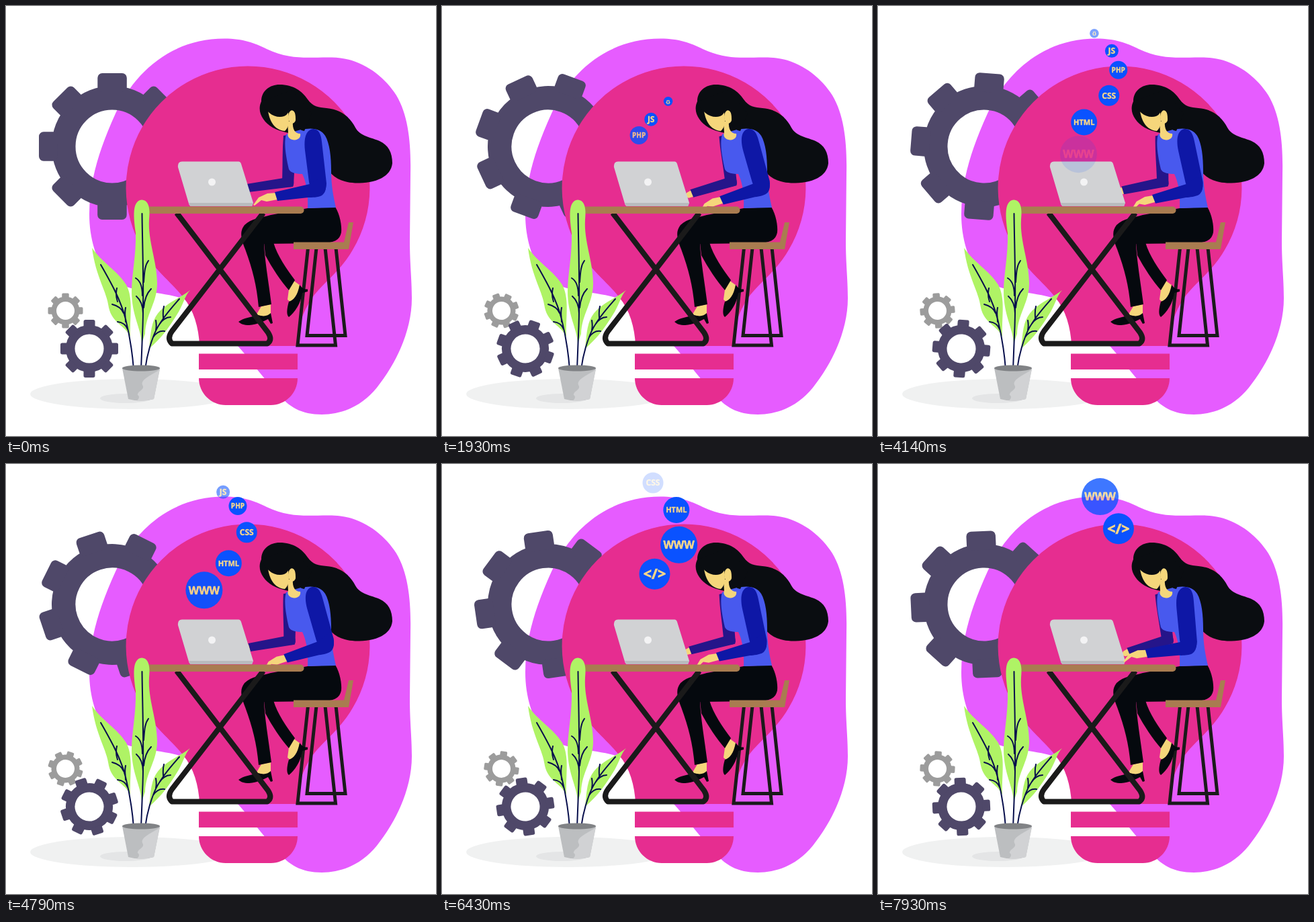
These frames come from a looping animation (640x640 px, 8000 ms). An HTML page:

```html
<!DOCTYPE html>
<html lang="en">
<head>
<meta charset="utf-8">
<title>Coding at a desk</title>
<style>
html, body { margin: 0; height: 100%; overflow: hidden; background: #fff; }
svg { display: block; width: 100vw; height: 100vh; }
text { font-family: "Open Sans", "Noto Sans", sans-serif; font-weight: 700; text-anchor: middle; fill: #fbd888; stroke: #fbd888; }
.line { fill: none; stroke: #1a1a1a; stroke-linejoin: round; }
.vein { fill: none; stroke: #080f4c; stroke-width: 2; stroke-linecap: round; }
.skin { fill: #f5d67b; }
.dark { fill: #05090e; }
.hair { fill: #0a0d11; }
.wood { fill: #a97c50; }
.pink { fill: #e62d90; }
</style>
</head>
<body>
<svg viewBox="0 0 640 640">
  <path fill="#e65cff" d="M325 48.500C353 48.500 370 55 388 64C425 81 448 76 485 76.500C527 77 562 103 581 133C599 163 603 205 602 250L601 350C601 385 604 405 604 435C604 482 582 530 552 568C529 596 500 608 470 608C440 608 420 597 404 575C384 556 364 527 345 506C325 485 308 462 285 447C262 430 232 429 205 424C183 420 168 416 154 402C134 381 124 345 124 310C124 262 138 215 163 160C190 100 245 48.500 325 48.500Z"/>
  <ellipse cx="188" cy="577.500" rx="152" ry="22.500" fill="#f0f1f1"/>
  <g id="gears"></g>

  <g class="pink">
    <path d="M360 89.500A181 181 0 0 1 516 363C497 396 472 412 456 434C441 456 434 478 433 506H288C287 478 279 452 264 434C248 412 223 396 204 363A181 181 0 0 1 360 89.500Z"/>
    <rect x="287" y="517.500" width="147" height="23.500"/>
    <path d="M287 554H434C434 576 416 594 394 594H327C305 594 287 576 287 554Z"/>
  </g>

  <!-- woman -->
  <path class="hair" d="M380 142C380 126 393 117 407 117C428 117 441 127 449 139C457 150 465 151 477 152C500 154 513 167 520 181C527 194 545 196 556 201C569 207 575 218 575 234C573 254 551 263 526 263.500C505 264 490 258 480 245L455 190C432 192 412 189 397 181C382 172 373 157 380 142Z"/>
  <path class="line" stroke-width="5" style="stroke-linejoin:miter" d="M462 360L448 490.500H505L491 360M449.500 360L434 505H490.500L475 360"/>
  <path class="skin" d="M427 408L438 416L435 431L425 442L419 437L421 422ZM380 447L394 444V459L381 466L371 462Z"/>
  <path class="dark" d="M346 470C354 464 364 463 376 460C384 463 390 461 394 457L397 472L394 473L390 466C382 470 374 474 362 475C354 475 349 473 346 470Z"/>
  <path class="dark" d="M437 415C440 419 443 422 449 421.500V425L441 427C439 442 430 456 421 463C417 460 418 450 421 440C428 438 434 431 437 415Z"/>
  <path class="dark" d="M384 352H398C404 372 418 392 430 408L421 423C409 409 396 390 386 371Z"/>
  <path class="dark" d="M449 301L490 299C497 310 500 327 499 337C497 348 488 353 470 353L384 354C385 378 391 412 395 444L376 448C373 415 367 392 356 362C349 344 348 335 355 326C365 316 380 315 394 311Z"/>
  <path class="wood" d="M428 351.500H503L510 322H517L510 362H428Z"/>

  <g id="backArm">
    <path fill="#25158a" d="M413 193C411 215 412 238 411 260C414 270 425 272 428 266C429 245 432 215 430 190Z"/>
    <g id="backFore">
      <path class="skin" d="M362 265L352 269L348 274L354 277L363 276Z"/>
      <path fill="#25158a" d="M358 265L413 256L424 253C429 257 429 265 427 269L361 277Z"/>
    </g>
  </g>
  <path fill="#4859ee" d="M417 191C428 187 436 184 446 183C460 181 470 185 475 193C482 205 484 225 484 245C484 270 488 286 491 300L449 301C450 280 447 262 441 250C433 250 424 249 421 243C417 225 413 205 417 191Z"/>

  <path class="skin" d="M419 172L420 189C418 193 421 199 429 199.500C436 199 439 195 438 190C430 190 426 183 427 172Z"/>
  <path class="skin" d="M390 156C392 170 399 185 415 186C419 182 421 178 421 170L420 158Z"/>
  <ellipse class="skin" cx="426" cy="165" rx="6" ry="10"/>
  <path class="hair" d="M381 142C386 160 402 168 414 164C420 162 419 156 425 155C432 156 431 166 431 174C434 181 437 185 444 186L455 160L425 125Z"/>

  <!-- laptop -->
  <path fill="#d1d2d4" d="M262 231.500H346Q349 231.500 350 235L368 293L366 298H276Q273 298 272 294L256 240Q255 232 262 231.500Z"/>
  <path fill="#b9bbbd" d="M272 293H368L366 298H276Q273 298 272 293Z"/>
  <circle cx="306.500" cy="262" r="5.500" fill="#f3f3f4"/>

  <g id="frontArm">
    <path fill="#0e17a6" d="M457 183C466 183 469 192 470 202L477 264C477 276 470 284 463 283C456 281 453 272 451 262L445 215C443 198 446 184 457 183Z"/>
    <g id="frontFore">
      <path class="skin" d="M403 278L389 279L376 285L368 296L370 297L380 289L388 291L404 288Z"/>
      <path fill="#0e17a6" d="M400 277L452 265L468 256C478 260 479 276 470 282C465 285 455 285 450 285L404 290Z"/>
    </g>
  </g>

  <!-- table -->
  <path class="line" stroke-width="8" d="M383 308L247 484Q239 495 247 502.500H389Q397 497 390 486L254 308"/>
  <rect class="wood" x="195" y="298.500" width="248.500" height="10.500" rx="5"/>

  <!-- plant -->
  <ellipse cx="178" cy="584" rx="38" ry="7" fill="#e4e5e6"/>
  <g fill="#aff365">
    <path d="M202 288.500C212 289 215 300 213 318C211 350 225 380 225 413C225 442 208 458 207 488L202 502C201 480 187 460 187 425C187 400 194 370 193 338C190 315 187 290 202 288.500Z"/>
    <path d="M128 360C143 382 166 394 179 415C190 436 184 462 185 492C177 475 158 472 153 449C150 424 134 405 128 360Z"/>
    <path d="M274 423C266 431 263 447 254 460C244 476 234 492 213 510C215 494 215 475 223 462C234 444 254 438 274 423Z"/>
  </g>
  <path class="vein" d="M202.500 309C203 360 206 430 203 490L201 541M212 379C206 387 206 398 205 411M193 405C200 409 203 419 203 431M216 421C209 428 206 438 205 449M194 432C201 438 204 447 204 458
    M141 385C155 410 170 435 178 466C184 490 188 515 190 541M165 420C163 428 164 434 166 440M158 444C166 446 172 450 175 457M178 449C176 458 178 463 178 470M166 470C174 471 178 474 181 481
    M258 436C242 454 227 472 220 490C213 508 209 525 207 541M235 447C233 455 234 459 234 464M245 463C238 463 232 468 229 473M223 468C224 474 224 478 223 482M236 484C229 483 223 487 219 493"/>
  <path fill="#bcbec0" d="M173 539H229L220 585Q201 590 182 585Z"/>
  <path fill="#d1d2d4" d="M229 541C218 549 200 555 203 564C208 571 195 573 196 579C200 582 197 585 195 587.500Q210 588 220 585Z"/>
  <ellipse cx="201" cy="539" rx="28" ry="4.500" fill="#808285"/>

  <g id="icons"></g>
</svg>
<script>
const NS = "http://www.w3.org/2000/svg";
const LOOP = 8, SPEED = 54, LEAD = 5, END = 240, SPIN = 33.7;
const $ = id => document.getElementById(id);
const clamp = v => Math.max(0, Math.min(1, v));

function add(parent, tag, attrs, text) {
  const el = document.createElementNS(NS, tag);
  for (const k in attrs) el.setAttribute(k, attrs[k]);
  if (text) el.textContent = text;
  return parent.appendChild(el);
}

// outer radius, body radius, hole radius, tooth width
function gear(x, y, outer, body, hole, width, color, dir) {
  const g = add($("gears"), "g", { fill: color });
  add(g, "circle", { r: (body + hole) / 2, fill: "none", stroke: color, "stroke-width": body - hole });
  for (let a = 0; a < 360; a += 45)
    add(g, "rect", { x: -width / 2, y: -outer, width, height: outer - body * 0.9, rx: width * 0.16, transform: `rotate(${a})` });
  return t => g.setAttribute("transform", `translate(${x} ${y}) rotate(${dir * SPIN * t})`);
}

const gears = [
  gear(158, 209, 109, 90, 54.5, 43.5, "#4f4869", 1),
  gear(88.5, 453.5, 26, 21, 13.5, 10.5, "#9c9c9c", -1),
  gear(124, 510, 43, 35, 21.5, 17, "#4f4869", 1)
];

// label, radius, font size, start time
const icons = [
  ["{}", 6.8, 7.5, 0.135], ["JS", 10, 12, 0.815], ["PHP", 13.5, 10, 1.37], ["CSS", 15.5, 12, 2.14],
  ["HTML", 19.5, 11, 3.14], ["WWW", 27.5, 16, 4.14], ["</>", 23, 21.5, 5.18]
].map(([label, r, size, start]) => {
  const g = add($("icons"), "g", {});
  add(g, "circle", { r, fill: "#0a52ff" });
  add(g, "text", { "font-size": size, y: size * 0.36, "stroke-width": size * 0.03 }, label);
  return { g, start };
});

// smooth curve through the points the bubbles rise along
const pts = [[301, 225], [294, 213], [291, 205], [297, 184], [321, 159], [344, 133], [354.5, 116], [358, 97],
  [348, 67], [330, 48], [317, 36], [314, 28], [316, 20]];
const at = i => pts[Math.max(0, Math.min(pts.length - 1, i))];
let d = "M" + pts[0];
for (let i = 0; i < pts.length - 1; i++) {
  const [a, b, c, e] = [at(i - 1), at(i), at(i + 1), at(i + 2)];
  d += "C" + [0, 1].map(k => b[k] + (c[k] - a[k]) / 6) + " " + [0, 1].map(k => c[k] - (e[k] - b[k]) / 6) + " " + c;
}
const track = document.createElementNS(NS, "path");
track.setAttribute("d", d);
const scale = track.getTotalLength() / (END + LEAD);

// [time, swing] pairs
const frontKeys = [[0, 0], [0.8, 0.07], [1, 0.2], [1.71, 0.9], [2.3, 1.25], [2.6, 1.22], [2.86, 1.02], [3.5, 0.7],
  [3.85, 0.58], [4.14, 0.65], [4.8, 1.07], [5.5, 0.9], [6.43, 0.64], [6.93, 0.6], [7.75, 0], [7.93, -0.2], [8, -0.24]];
const backKeys = [[0, 0], [1, 0.55], [2.4, 1], [2.9, 1], [4.14, 0.35], [4.8, 0.2], [5.5, 0.37], [6.43, 0.7], [7.6, 1], [8, 0.93]];

// cubic interpolation through the keys
function swing(keys, t) {
  let i = keys.findIndex(k => k[0] > t) - 1;
  if (i < 0) i = keys.length - 2;
  const slope = j => {
    const a = keys[Math.max(0, j - 1)], b = keys[Math.min(keys.length - 1, j + 1)];
    return (b[1] - a[1]) / (b[0] - a[0]);
  };
  const [t0, v0] = keys[i], [t1, v1] = keys[i + 1], h = t1 - t0, u = (t - t0) / h;
  return v0 + (v1 - v0) * u * u * (3 - 2 * u) + h * u * (1 - u) * (slope(i) * (1 - u) - slope(i + 1) * u);
}

const turn = (id, angle, x, y) => $(id).setAttribute("transform", `rotate(${angle} ${x} ${y})`);

function draw(t) {
  gears.forEach(spin => spin(t));
  const f = swing(frontKeys, t), b = swing(backKeys, t);
  turn("frontArm", -8.3 * f, 457, 193);
  turn("frontFore", 1.3 * f, 466, 271);
  turn("backArm", -10.5 * b, 421, 197);
  turn("backFore", b, 424, 262);
  for (const { g, start } of icons) {
    const s = (t - start) * SPEED;
    const alpha = Math.min(clamp((s + LEAD) / 42), clamp((END - s) / 45));
    const p = track.getPointAtLength((s + LEAD) * scale);
    g.setAttribute("transform", `translate(${p.x} ${p.y})`);
    g.setAttribute("opacity", alpha);
  }
}

const begin = performance.now();
function tick() {
  draw((performance.now() - begin) / 1000 % LOOP);
  requestAnimationFrame(tick);
}
tick();
</script>
</body>
</html>
```
